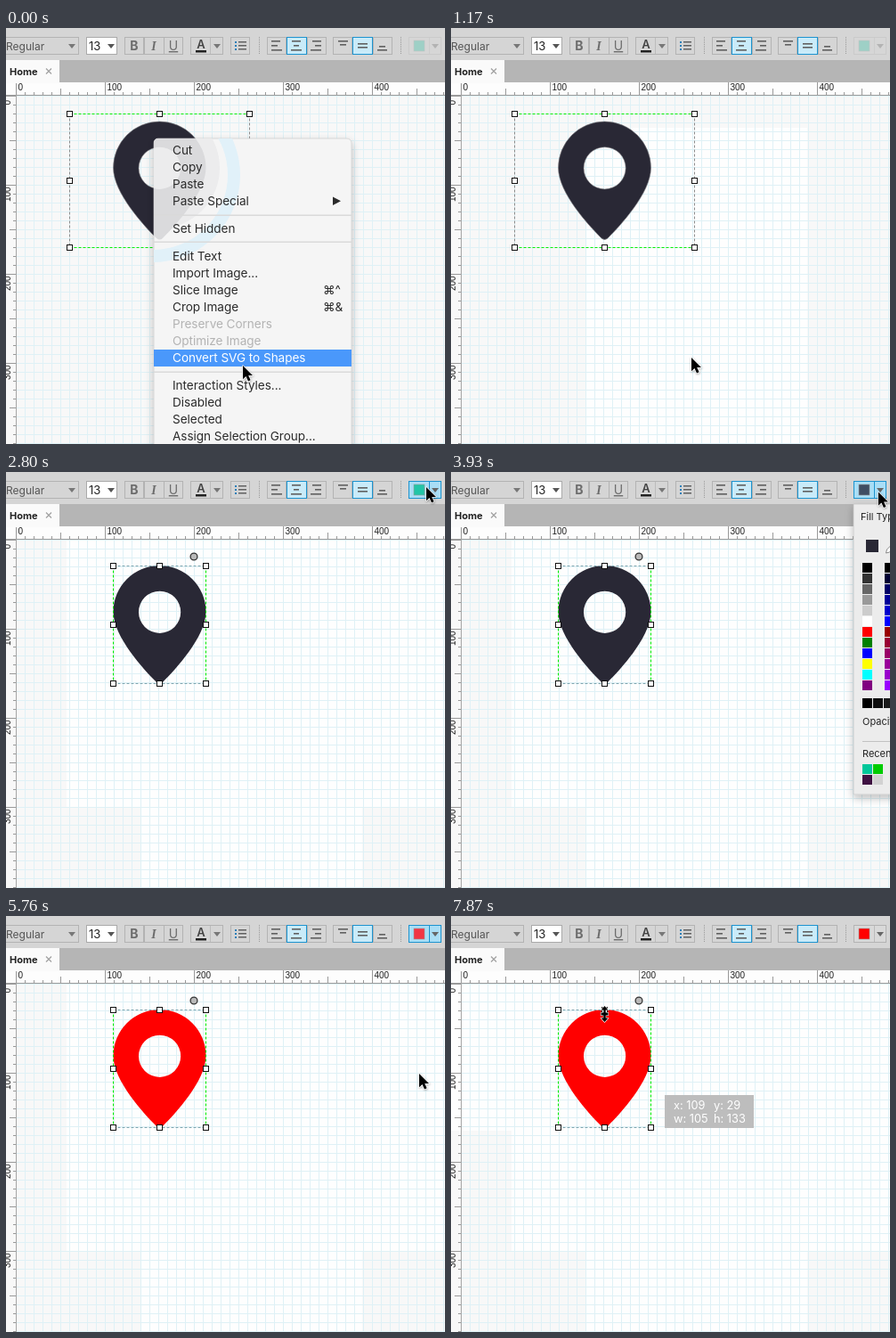
Recreate the animation shown at these times as an HTML page. Size 493x467 px, loop 7.99 s.

```html
<!DOCTYPE html>
<html lang="en">
<head>
<meta charset="utf-8">
<title>Convert shape and recolour</title>
<style>
  html, body { margin: 0; width: 100%; height: 100%; overflow: hidden; background: #f8f8f8; }
  svg { display: block; width: 493px; height: 467px; }
  text { font-family: Inter, "Open Sans", sans-serif; white-space: pre; }
  .ruler text { font: 10px "Liberation Sans", sans-serif; fill: #222; }
  .menu text { font-size: 13.6px; letter-spacing: -.05px; fill: #2b2b2b; }
  .menu .off { fill: #b3b3b3; }
  .menu .key { font-family: Inter, "DejaVu Sans", sans-serif; }
  .menu .lit { fill: #fff; }
  .panel text { font-size: 11px; fill: #222; }
</style>
</head>
<body>
<svg id="stage" viewBox="0 0 493 467" xmlns="http://www.w3.org/2000/svg"></svg>
<script>
const LOOP = 7990;
const OX = 11, OY = 76;
const PIN = 'M120.5 157A52 52 0 0 1 224.5 157C224.5 185 190 222 176 236Q172.5 239 169 236C155 222 120.5 185 120.5 157Z' +
            'M149 157.3a23.6 23.6 0 0 0 47.2 0a23.6 23.6 0 0 0 -47.2 0Z';

// Markup helpers
const rect = (x, y, w, h, fill, more = '') => `<rect x="${x}" y="${y}" width="${w}" height="${h}" fill="${fill}" ${more}/>`;
const text = (x, y, s, more = '') => `<text x="${x}" y="${y}" ${more}>${s}</text>`;
const path = (d, fill, more = '') => `<path d="${d}" fill="${fill}" ${more}/>`;
const group = (id, ...parts) => `<g id="${id}">${parts.join('')}</g>`;
const range = n => [...Array(n).keys()];
const box = (x, w, stroke = '#b3b3b3', fill = 'none') => rect(x + .5, 10.5, w - 1, 19, fill, `stroke="${stroke}"`);
const arrow = (x, fill = '#777') => path(`M${x - 4} 18h8l-4 5z`, fill);
const lines = (rows, fill = '#606060') => rows.map(([x, y, w]) => rect(x, y, w, 1.6, fill)).join('');

function canvas() {
  return rect(0, 61, 493, 406, '#f8f8f8') +
    rect(152, 112, 248, 355, '#fefefe', 'id="clearMenu"') +
    rect(68, 76, 425, 301, '#fefefe', 'id="clearTop"') +
    rect(0, 76, 68, 165, '#fefefe', 'id="clearLeft"') +
    rect(OX, OY, 482, 391, 'url(#grid)');
}

function rulers() {
  const len = i => i % 10 ? (i % 5 ? 3 : 7) : 14;
  let s = rect(0, 61, 493, 15, '#fdfdfd') + rect(0, 75, 493, 1, '#9b9b9b') + rect(11, 61, 1, 406, '#a5a5a5');
  for (const i of range(49)) s += rect(OX + i * 10, 75 - len(i), 1, len(i), '#999');
  for (const i of range(40)) s += rect(11 - Math.min(len(i), 11), OY + i * 10, Math.min(len(i), 11), 1, '#999');
  for (const i of range(5)) s += text(OX + i * 100 + 2.5, 69.5, i * 100);
  for (const i of range(4)) s += text(0, 0, i * 100, `transform="translate(5 ${OY + i * 100 + (i ? 19 : 10.5)}) rotate(-90)"`);
  return `<g class="ruler">${s}</g>`;
}

function toolbar() {
  const letter = (x, s, more) => text(x, 25, s, `font-size="14" text-anchor="middle" fill="#6c6c6c" ${more}`);
  const split = x => `<path d="M${x}.5 10v20" stroke="#9a9a9a" stroke-dasharray="1 1"/>`;
  const left = x => lines([[x, 14, 10], [x, 19, 7], [x, 24, 12]]);
  const tools = [
    box(-9, 91), text(0, 25, 'Regular', 'font-size="12" fill="#555"'), arrow(74),
    box(90, 35, '#aaa', '#fff'), text(93, 25, '13', 'font-size="13" fill="#222"'), arrow(118, '#555'),
    box(133, 22), box(155, 23), box(177, 22),
    letter(144, 'B', 'font-weight="700"'),
    letter(166, 'I', 'style="font-family:\'Liberation Serif\',serif" font-style="italic" font-weight="700"'),
    letter(188, 'U', 'text-decoration="underline"'),
    box(207, 37), rect(229, 11, 1, 18, '#bbb'),
    text(219, 23, 'A', 'font-size="13" font-weight="600" text-anchor="middle" fill="#444"'),
    rect(213, 25, 12, 2.5, '#222'), arrow(237),
    box(252, 22),
    [15, 19, 23].map(y => rect(257, y, 2, 2, '#2a7fb8') + rect(261, y, 9, 1.5, '#606060')).join(''),
    split(284), box(293, 22), box(338, 22), box(315, 23, '#1c93cf'),
    left(298), lines([[321, 14, 10], [323, 19, 6], [320, 24, 12]]), lines([[344, 14, 10], [347, 19, 7], [342, 24, 12]]),
    box(367, 22), box(412, 22), box(389, 23, '#1c93cf'),
    lines([[373, 14, 11], [375, 18, 7]]), lines([[395, 17, 11], [395, 21, 11]]), lines([[419, 20, 7], [417, 24, 11]]),
    split(443),
    group('fill',
      rect(452.5, 10.5, 36, 19, '#d9d9d9', 'id="fillBox"'),
      rect(475, 11, 1, 18, '#bbb', 'id="fillSplit"'),
      rect(458, 14, 12, 12, '#22c5a7', 'id="fillColor" stroke="#999" stroke-width=".6"'),
      arrow(482, '#666'))
  ];
  return rect(0, 0, 493, 36, '#d5d5d5') + rect(315, 10, 23, 20, '#c9ebf9') + rect(389, 10, 23, 20, '#c9ebf9') +
    group('tools', ...tools) +
    rect(0, 36, 493, 25, '#b5b5b5') + rect(0, 36, 60, 26, '#fafafa') +
    text(4, 53, 'Home', 'font-size="11" font-weight="700" fill="#222"') +
    '<path d="M45 45.500l6 6m0-6l-6 6" stroke="#a2a2a2" stroke-width="1.300"/>';
}

function selection(id, x0, y0, x1, y1, across, down) {
  const line = (d, c) => `<path d="${d}" stroke="${c}" fill="none" stroke-dasharray="3 2"/>`;
  const xm = 172.5, ym = 171.5;
  const spots = [[x0, y0], [xm, y0], [x1, y0], [x0, ym], [x1, ym], [x0, y1], [xm, y1], [x1, y1]];
  return group(id,
    line(`M${x0} ${y0}H${x1}M${x0} ${y1}H${x1}`, across), line(`M${x0} ${y0}V${y1}M${x1} ${y0}V${y1}`, down),
    ...spots.map(([x, y]) => rect(x - 3, y - 3, 6, 6, '#fff', 'stroke="#111"')),
    id === 'shapeSel' ? '<circle cx="211" cy="95" r="3.900" fill="#b9b9b9" stroke="#333" stroke-width="1.300"/>' : '');
}

function menu() {
  const rows = [
    [137, 'Cut'], [156, 'Copy'], [175, 'Paste'], [194, 'Paste Special'], [225, 'Set Hidden'],
    [256, 'Edit Text'], [275, 'Import Image...'], [294, 'Slice Image', '⌘^'], [313, 'Crop Image', '⌘&amp;'],
    [332, 'Preserve Corners', 0, 'off'], [351, 'Optimize Image', 0, 'off'], [370, 'Convert SVG to Shapes', 0, 'pick'],
    [401, 'Interaction Styles...'], [420, 'Disabled'], [439, 'Selected'], [458, 'Assign Selection Group...']
  ];
  const label = ([y, s, key, kind]) =>
    text(187, y + 5, s, kind === 'off' ? 'class="off"' : kind ? 'id="pick"' : '') +
    (key ? text(356, y + 5, key, 'class="key"') : '');
  return `<g id="menu" class="menu">` +
    rect(166, 124, 222, 360, '#f5f5f5', 'rx="5" filter="url(#soft)" stroke="#c4c4c4" stroke-width=".6"') +
    `<g clip-path="url(#menuClip)"><circle cx="165" cy="165" r="91" fill="none" stroke="#e1f1f9" stroke-width="14"/>` +
    `<circle cx="172" cy="157" r="68" fill="#ececed"/>` + path(PIN, '#dadadc', 'fill-rule="evenodd"') + '</g>' +
    [210, 240, 386].map(y => rect(166, y - .5, 222, 1.5, '#dadada')).join('') +
    rect(166, 361, 222, 19, '#4a98fb', 'id="bar"') + rows.map(label).join('') +
    path('M367 189.500l9 4.700l-9 4.700z', '#2b2b2b') + '</g>';
}

function panel() {
  const hex = n => '#' + n.toString(16).padStart(6, '0');
  const first = ['#000', '#333', '#666', '#999', '#ccc', '#fff', '#f00', 'green', '#00f', '#ff0', '#0ff', 'purple'];
  const second = range(12).map(i => hex((i < 6 ? 0 : 0x990000) + (i % 6) * 0x33));
  const cell = (x, y, c) => rect(x, y, 11, 11, c);
  return `<g id="panel" class="panel">` +
    rect(452, 36, 60, 326, '#ececec', 'filter="url(#soft)" stroke="#b8b8b8" stroke-width=".6"') +
    text(460, 54, 'Fill Type') + rect(466, 76, 14, 14, '#999', 'id="preview"') +
    path('M488.500 91l1-4l6-6l3 3l-6 6z', '#fff', 'stroke="#888"') +
    first.map((c, i) => cell(462, 102 + i * 12, c)).join('') +
    second.map((c, i) => cell(487, 102 + i * 12, c)).join('') +
    ['#000', '#0d0d0d', '#1a1a1a'].map((c, i) => cell(462 + i * 12, 254, c)).join('') +
    rect(462.5, 0, 10, 10, 'none', 'id="ring" stroke="#f4f4f4" stroke-width="1.500"') +
    text(462, 284, 'Opacity') + rect(462, 302, 31, 1, '#c2c2c2') + text(462, 320, 'Recent') +
    cell(462, 328, '#00c79a') + cell(474, 328, '#0c0') + cell(462, 340, '#3f1242') + cell(474, 340, '#d2d2d2') + '</g>';
}

function readout() {
  const word = (x, y, s) => text(x, y, s, 'font-size="12.800" fill="#fff"');
  return group('readout', rect(240, 201, 100, 37, '#bdbdbd'),
    word(250, 217, 'x: 109'), word(295, 217, 'y: 29'), word(250, 231.5, 'w: 105'), word(295, 231.5, 'h: 133'));
}

function pointers() {
  const edge = 'stroke="#fff" stroke-width="1.200" paint-order="stroke" stroke-linejoin="round"';
  return group('arrow', path('M0 0V15.200L3.500 12L6 17.400L8.600 16.300L6.200 11H11Z', '#000', edge + ' filter="url(#drop)"')) +
    group('resize', path('M0-9l4 4.500H1.200V-1.500H4V1.500H1.200V4.500H4L0 9L-4 4.500H-1.200V1.500H-4V-1.500H-1.200V-4.500H-4Z', '#000', edge));
}

const stage = document.getElementById('stage');
stage.innerHTML = `<defs>
  <pattern id="grid" x="${OX}" y="${OY}" width="10" height="10" patternUnits="userSpaceOnUse">
    <path d="M0 0H10V1H1V10H0Z" fill="#dff1f6"/></pattern>
  <clipPath id="menuClip"><rect x="166" y="124" width="222" height="360" rx="5"/></clipPath>
  <filter id="soft" x="-20%" y="-10%" width="140%" height="120%"><feDropShadow dx="0" dy="4" stdDeviation="5" flood-opacity=".25"/></filter>
  <filter id="drop" x="-30%" y="-30%" width="180%" height="180%"><feDropShadow dx=".5" dy="1" stdDeviation=".8" flood-opacity=".35"/></filter>
  </defs>` + canvas() + path(PIN, '#292835', 'id="pin" fill-rule="evenodd"') +
  selection('imageSel', 71.5, 96.5, 273.5, 246.5, '#0e0', '#8c8c8c') +
  selection('shapeSel', 120.5, 105.5, 224.5, 237.5, '#7fa6b0', '#0e0') +
  rulers() + toolbar() + panel() + menu() + readout() + pointers();

const el = {};
stage.querySelectorAll('[id]').forEach(e => el[e.id] = e);

// Key moments in ms
const CLOSE = 900, CONVERT = 1290, HOVER = 2740, OPEN = 3630, PICK = 5650, LEAVE = 5820, CLEAR = 6600, RESELECT = 7410;

// Pointer stops: time, x, y
const stops = [
  [0, 266, 379], [30, 266, 379], [120, 267, 388], [340, 267, 388], [600, 270, 370], [1190, 270, 370],
  [1690, 214, 176], [1720, 214, 176], [1860, 207, 162], [2060, 207, 162], [2800, 472, 17], [2900, 472, 17],
  [3270, 480, 22], [3900, 480, 22], [4700, 464, 151], [4995, 464, 151], [5350, 464, 177], [5790, 464, 177],
  [6240, 380, 176], [6600, 380, 176], [7290, 204, 161.5], [7400, 204, 161.5], [7820, 172.5, 110], [LOOP, 172.5, 110]
];

function pointerAt(t) {
  const i = stops.findIndex((s, k) => k && t <= s[0]);
  const [ta, xa, ya] = stops[i - 1], [tb, xb, yb] = stops[i];
  const u = (t - ta) / (tb - ta), k = u * u * (3 - 2 * u);
  return [xa + (xb - xa) * k, ya + (yb - ya) * k];
}

// Last value whose start time has passed
const pick = (t, steps) => steps.reduce((v, [at, next]) => t >= at ? next : v, steps[0][1]);
const show = (id, on) => el[id].setAttribute('visibility', on ? 'visible' : 'hidden');
const set = (id, name, value) => el[id].setAttribute(name, value);
const within = (t, a, b) => t >= a && t < b;

function draw(t) {
  const lit = !within(t, 60, 420), hover = within(t, HOVER, LEAVE);
  const idle = within(t, CLEAR, RESELECT), resizing = t >= 7720;

  show('clearMenu', t >= CLOSE);
  show('clearTop', t >= CONVERT);
  show('clearLeft', t >= CLEAR);

  show('menu', t < 1150);
  set('menu', 'opacity', t < CLOSE ? 1 : Math.max(0, .85 - (t - CLOSE) / 290));
  set('bar', 'opacity', lit ? 1 : 0);
  set('pick', 'class', lit ? 'lit' : '');

  show('imageSel', t < CONVERT);
  show('shapeSel', t >= CONVERT && !idle);
  set('pin', 'fill', t < PICK ? '#292835' : '#f00');
  set('pin', 'stroke', t < CONVERT ? '#77777c' : 'none');
  set('pin', 'stroke-width', .6);

  set('tools', 'opacity', idle ? .42 : 1);
  set('fill', 'opacity', t < CONVERT ? .3 : 1);
  set('fillBox', 'fill', hover ? '#a9def6' : '#d9d9d9');
  set('fillBox', 'stroke', hover ? '#1c93cf' : '#b3b3b3');
  set('fillSplit', 'fill', hover ? '#1c93cf' : '#bbb');
  set('fillColor', 'fill', pick(t, [[0, '#22c5a7'], [OPEN, '#3f4d63'], [PICK, '#f23645'], [LEAVE, '#f00']]));

  show('panel', within(t, OPEN, PICK));
  set('preview', 'fill', pick(t, [[0, '#292835'], [4560, '#999'], [5260, '#f00']]));
  set('ring', 'y', pick(t, [[0, 138.5], [5260, 174.5]]));
  show('ring', within(t, 4560, PICK));

  show('readout', t >= 7870);
  const [x, y] = pointerAt(t);
  const id = resizing ? 'resize' : 'arrow';
  show('arrow', !resizing);
  show('resize', resizing);
  set(id, 'transform', `translate(${x.toFixed(1)} ${y.toFixed(1)})`);
}

const start = performance.now();
function tick() {
  draw((performance.now() - start) % LOOP);
  requestAnimationFrame(tick);
}
tick();
</script>
</body>
</html>
```
